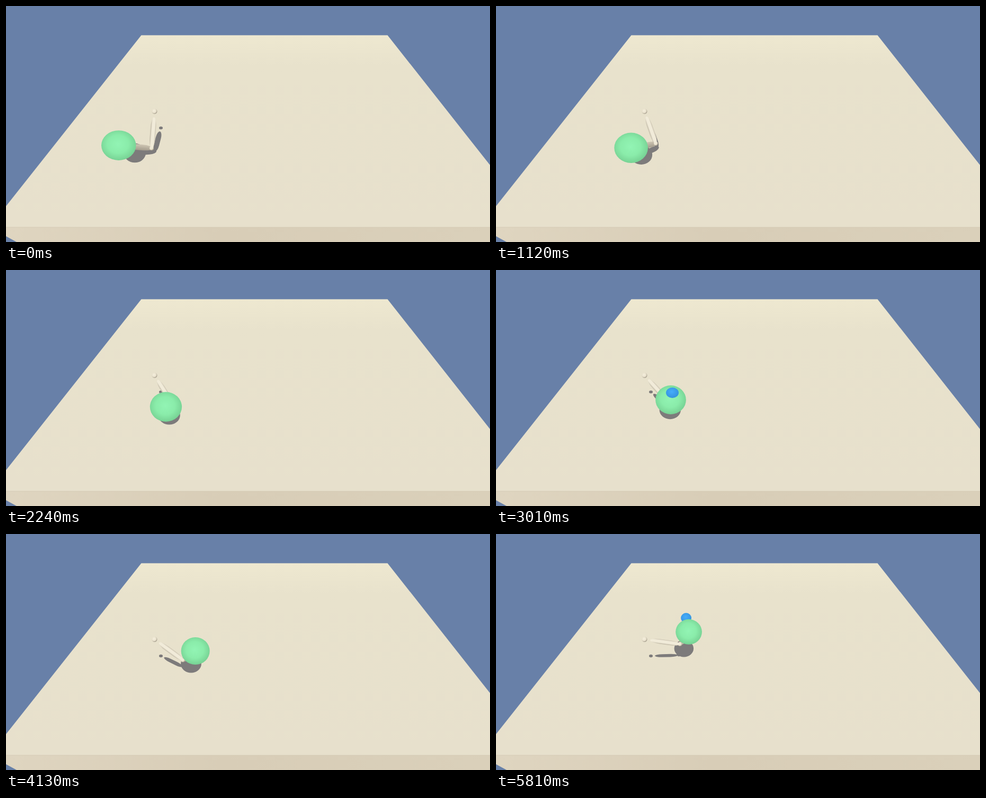
An HTML page that plays this animation: 914x448 px, repeating every 5880 ms.

```html
<!DOCTYPE html>
<html lang="en">
<head>
<meta charset="utf-8">
<title>Reaching arm</title>
<style>
  html, body { margin: 0; width: 100%; height: 100%; overflow: hidden; background: #6880a8; }
  svg { display: block; width: 100%; height: 100%; }
</style>
</head>
<body>
<svg viewBox="0 0 914 448" preserveAspectRatio="none">
  <defs>
    <linearGradient id="floor" x2="0" y2="1">
      <stop offset="0" stop-color="#eee8d0"/>
      <stop offset=".16" stop-color="#e8e2cc"/>
      <stop offset="1" stop-color="#e7e0cc"/>
    </linearGradient>
    <linearGradient id="front">
      <stop offset="0" stop-color="#dfd5c0"/>
      <stop offset=".45" stop-color="#d8cdb7"/>
      <stop offset="1" stop-color="#dad0ba"/>
    </linearGradient>
    <radialGradient id="green" cx=".48" cy=".46" r=".55">
      <stop offset="0" stop-color="#92f4b4"/>
      <stop offset=".55" stop-color="#8aecaa"/>
      <stop offset="1" stop-color="#76d193"/>
    </radialGradient>
    <radialGradient id="blue" cx=".45" cy=".4" r=".6">
      <stop offset="0" stop-color="#45adfb"/>
      <stop offset="1" stop-color="#3593de"/>
    </radialGradient>
    <radialGradient id="joint" cx=".4" cy=".38" r=".62">
      <stop offset="0" stop-color="#f6f0de"/>
      <stop offset=".65" stop-color="#e8e0cc"/>
      <stop offset="1" stop-color="#a29a89"/>
    </radialGradient>
    <linearGradient id="bone" x2="0" y2="1">
      <stop offset="0" stop-color="#c9c1ae"/>
      <stop offset=".25" stop-color="#f1ebd9"/>
      <stop offset=".7" stop-color="#f1ebd9"/>
      <stop offset="1" stop-color="#c0b8a5"/>
    </linearGradient>
    <linearGradient id="dullBone" x2="0" y2="1">
      <stop offset="0" stop-color="#a39b8c"/>
      <stop offset="1" stop-color="#cfc6b3"/>
    </linearGradient>
  </defs>
  <path fill="#6880a8" d="M0 0H914V448H0z"/>
  <path fill="url(#floor)" d="M255.500 55.500H720.500L914 302V420H0V380z"/>
  <path fill="url(#front)" d="M0 420H914V448H20L0 437z"/>
  <path stroke="#cfc5b0" stroke-width=".7" d="M0 420H914"/>
  <g fill="#7d7b7b">
    <ellipse cx="292.500" cy="231.500" rx="3.500" ry="2.700"/>
    <rect id="armShadow"/>
    <rect id="forearmShadow"/>
    <ellipse id="ballShadow"/>
  </g>
  <rect id="forearm" fill="url(#dullBone)"/>
  <ellipse id="elbow" fill="url(#joint)"/>
  <rect id="arm" fill="url(#bone)"/>
  <ellipse id="handBehind" fill="url(#blue)"/>
  <ellipse id="ball" fill="url(#green)"/>
  <ellipse id="handFront" fill="url(#blue)"/>
  <circle cx="280.500" cy="200" r="5" fill="url(#joint)"/>
</svg>
<script>
const LOOP = 5880, STEP = 70;
const PIVOT = [280.5, 200], PIVOT_SHADOW = [292.5, 231.5];

const mix = (a, b, u) => a + (b - a) * u;
const mixPoint = (a, b, u) => a.map((c, i) => mix(c, b[i], u));
const ease = x => { const u = Math.max(0, Math.min(1, x)); return u * u * (3 - 2 * u); };

// A point circling the pivot on a level plane; depth shrinks towards the viewer.
const orbit = (radius, angle) => ({
  x: -210 + radius * Math.cos(angle),
  depth: .994 - radius * Math.sin(angle) / 718
});

// Perspective with its vanishing point at (488, -240); drop slides the point
// along the light, where 1 is the ball's way down to the floor.
function project({ x, depth }, drop = 0) {
  const far = depth + .326 * drop;
  return [488 + (x - 53 * drop) / far, (444 + 182 * drop) / far - 240];
}

function set(id, attrs) {
  const node = document.getElementById(id);
  for (const name in attrs) node.setAttribute(name, attrs[name]);
}

const ellipse = (id, [cx, cy], rx, ry) => set(id, { cx, cy, rx, ry });

// Stretched capsule between two points.
function limb(id, a, b, half) {
  const dx = b[0] - a[0], dy = b[1] - a[1];
  const length = Math.hypot(dx, dy), angle = Math.atan2(dy, dx) * 180 / Math.PI;
  set(id, {
    width: length, height: 2 * half, rx: length * .32, ry: half, y: -half,
    transform: `translate(${a}) rotate(${angle})`
  });
}

function draw(t) {
  const s = t / 1000, progress = t / LOOP;

  const goal = orbit(88, 1.945 - .405 * s);
  const ball = project(goal), ballShadow = project(goal, 1);
  const floorDepth = goal.depth + .326;

  const wobble = .12 * Math.sin(2 * Math.PI * progress) ** 3;
  const swing = 1.3 - .125 * s - .0154 * s * s - wobble;
  const joint = orbit(70 + 23 * Math.sin(swing), swing);
  const elbow = project(joint);
  const elbowShadow = project(joint, .75 - .4 * Math.sin(swing));

  limb("armShadow", mixPoint(PIVOT_SHADOW, elbowShadow, .15), elbowShadow, mix(5, 2.8, progress));
  limb("forearmShadow", mixPoint(elbowShadow, ballShadow, -.08), ballShadow, 5);
  ellipse("ballShadow", ballShadow, 25 / floorDepth, 22 / floorDepth);

  limb("forearm", mixPoint(elbow, ball, -.04), ball, 5.5);
  ellipse("elbow", elbow, 4, 4);
  limb("arm", mixPoint(PIVOT, elbow, .16), elbow, 4.5 / joint.depth);

  const stretch = 12 * ((ball[0] - 457) / 457) ** 2;
  ellipse("ball", ball, (25.4 + stretch) / goal.depth, 25 / goal.depth);

  // The hand peeks out in front of the ball, later from behind its top.
  const emerge = 1 - ease((Math.abs(t - 3010) - 60) / 320);
  ellipse("handFront", [ball[0] + 3, ball[1] - 13.5], 12 * emerge, 10 * emerge);
  const rise = ease((t - 5180) / 630);
  ellipse("handBehind", [ball[0] - 5 * rise, ball[1] - 26.5 * rise], 10, 9.5);
}

const start = performance.now();
function frame() {
  const t = (performance.now() - start) % LOOP;
  draw(Math.floor(t / STEP) * STEP);
  requestAnimationFrame(frame);
}
frame();
</script>
</body>
</html>
```
